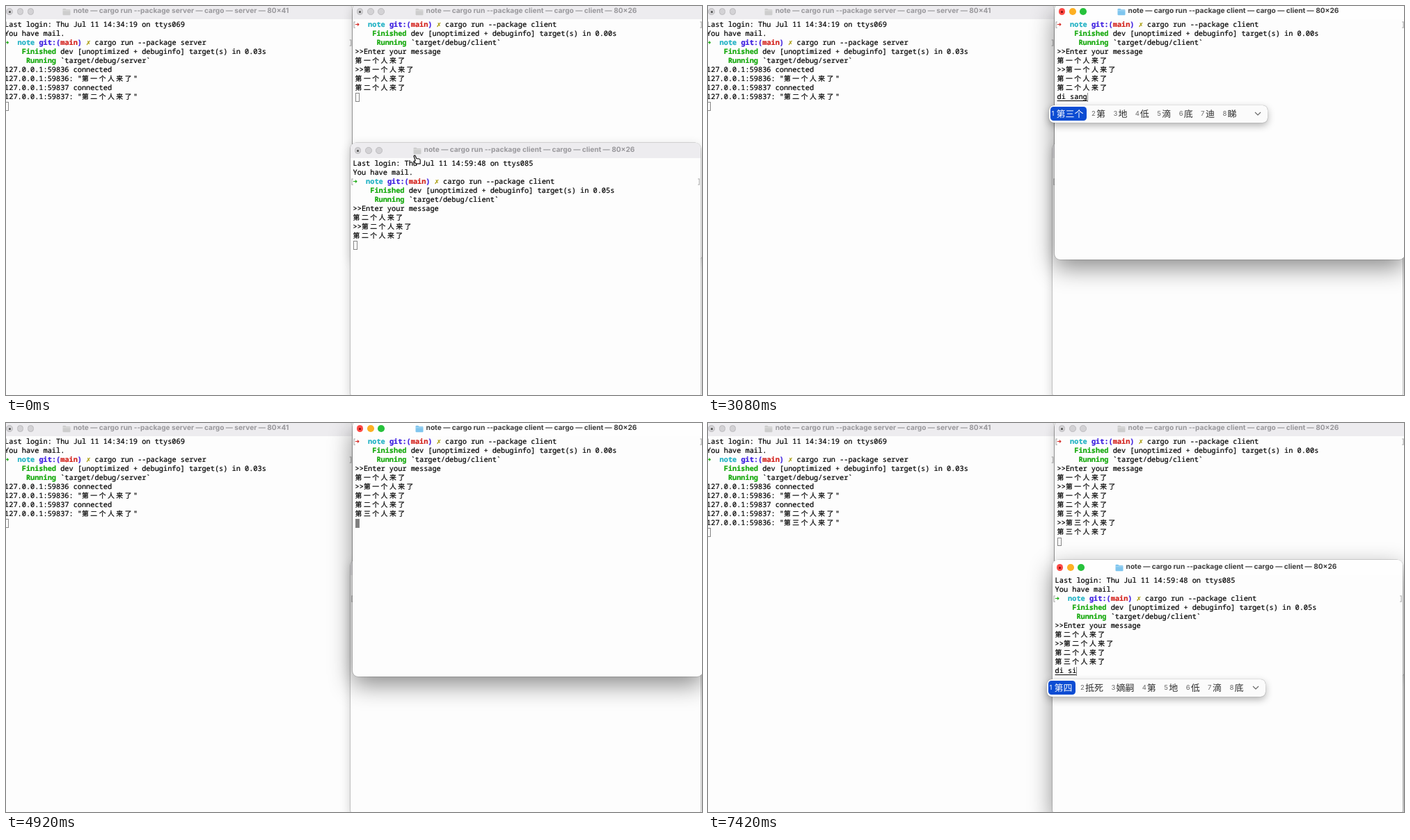
These frames come from a looping animation (1000 px wide and 560 px high, 8000 ms). An HTML page:

```html
<!DOCTYPE html>
<html lang="zh-CN">
<head>
<meta charset="utf-8">
<title>Terminal messages</title>
<style>
html, body { margin: 0; width: 100%; height: 100%; overflow: hidden; background: #fdfdfd; }
#stage { position: relative; width: 1000px; height: 560px; overflow: hidden; text-rendering: geometricPrecision; }
.win {
  position: absolute; width: 502.5px; height: 368px; border-radius: 8px; background: #fdfdfd; z-index: 1;
  box-shadow: 0 0 0 .6px rgba(0,0,0,.28), 0 5px 16px rgba(0,0,0,.2);
}
#server { left: -5.5px; top: -3px; height: 600px; z-index: 0; }
#upper { left: 498px; top: -3px; }
#lower { left: 495px; top: 197px; }
.win.front { z-index: 2; }
.win.active { box-shadow: 0 0 0 .6px rgba(0,0,0,.25), 0 12px 34px rgba(0,0,0,.45); }
.bar {
  position: relative; height: 22px; box-sizing: border-box; padding-right: 4px; border-radius: 8px 8px 0 0;
  display: flex; align-items: center; justify-content: center; gap: 3.5px;
  background: #edecef; color: #99989c; white-space: pre;
  font: 700 10.15px/21px Inter, "Liberation Sans", sans-serif;
}
.active .bar { background: #fefefe; color: #3d3d3d; }
.bar span { height: 22px; }
.folder { width: 12px; height: 11px; fill: #cdcdcd; }
.active .folder { fill: #7fc5ee; }
.bar .light {
  position: absolute; top: 6.2px; width: 9.6px; height: 9.6px; box-sizing: border-box;
  border-radius: 50%; background: #d3d2d5; border: .6px solid #bcbbbe;
}
.light:nth-child(1) { left: 5.7px; }
.light:nth-child(2) { left: 21px; }
.light:nth-child(3) { left: 36.4px; }
.light:nth-child(1)::after {
  content: ""; position: absolute; left: 2.7px; top: 2.7px; width: 3px; height: 3px;
  border-radius: 50%; background: #4a4a4a;
}
.lit .bar .light { border-color: transparent; }
.lit .light:nth-child(1) { background: #fd4a45; }
.lit .light:nth-child(1)::after { background: #7d0a08; }
.lit .light:nth-child(2) { background: #fdb024; }
.lit .light:nth-child(3) { background: #27c23c; }
.lit .bar .light:nth-child(1) { background: #fd4a45; }
.lit .bar .light:nth-child(2) { background: #fdb024; }
.lit .bar .light:nth-child(3) { background: #27c23c; }
pre {
  position: absolute; left: 3.6px; top: 23.5px; margin: 0; color: #000;
  font: 500 10.28px/13.1px "Noto Sans Mono", "DejaVu Sans Mono", monospace;
  -webkit-text-stroke: .22px;
}
.row { position: relative; height: 13.1px; white-space: pre; }
.han { font: 500 9.8px/0 "Noto Sans CJK SC", "Noto Sans CJK JP", sans-serif; letter-spacing: 2.54px; }
.mark::before, .mark::after { position: absolute; top: 0; color: #aaa; font-weight: 400; }
.mark::before { content: "["; left: -4.5px; }
.mark::after { content: "]"; left: 494.5px; }
b.green { color: #16a90d; }
b.red { color: #d3221c; }
b.cyan { color: #20b1c4; }
b.blue { color: #3a1be0; }
b.gold { color: #a79a07; }
.block {
  position: absolute; top: 0; width: 6.3px; height: 12.3px; box-sizing: border-box; border: 1px solid #868686;
}
.block.full { background: #808080; }
.typed { text-decoration: underline; text-underline-offset: 2px; text-decoration-thickness: 1px; }
.caret { position: absolute; top: 0; width: 1px; height: 13px; background: #888; }
.popup {
  position: absolute; top: 17.5px; width: 314px; height: 25px; box-sizing: border-box; padding: 0 2px;
  display: flex; align-items: center; gap: 5.4px; border-radius: 7px; background: #fbfbfb; color: #2c2c2c;
  box-shadow: 0 0 1px rgba(0,0,0,.5), 0 4px 11px rgba(0,0,0,.3);
  font: 13px/20px "Noto Sans CJK SC", "Noto Sans CJK JP", sans-serif;
  -webkit-text-stroke: 0;
}
.option { display: flex; height: 20px; padding: 0 4px 0 2px; border-radius: 4.5px; }
.option small { width: 7px; font: 9.5px/21px Inter, sans-serif; color: #6a6a6a; }
.option:first-child { background: #0b4cd3; color: #fff; }
.option:first-child small { color: #fff; }
.keycap {
  width: 15px; height: 15px; margin-top: 2px; border-radius: 3px; background: #476f8c; color: #fff;
  font: 700 11px/15px Inter, sans-serif; text-align: center;
}
.chevron { position: absolute; left: 295px; top: 9.5px; width: 10px; height: 6px; }
.chevron path { fill: none; stroke: #666; stroke-width: 1.1; }
#mouse { position: absolute; left: 0; top: 0; width: 14px; height: 18px; z-index: 5; overflow: visible; }
#mouse path { stroke-linejoin: round; stroke-linecap: round; }
</style>
</head>
<body>
<div id="stage">
  <div class="win" id="server"></div>
  <div class="win" id="upper"></div>
  <div class="win" id="lower"></div>
  <svg id="mouse"><path/></svg>
</div>
<script>
const LOOP = 8000, CELL = 6.168;
const byId = id => document.getElementById(id);
const paint = (color, text) => `<b class="${color}">${text}</b>`;
const han = text => text.replace(/[\u3400-\u9fff]+/g, '<span class="han">$&</span>');
const latest = (steps, t) => steps.filter(step => step[0] <= t).pop();

const says = n => `第${n}个人来了`;
const prompt = (arrow, kind) => `<span class="mark"></span>${paint(arrow, '➜')}  ${paint('cyan', 'note')} ` +
  paint('blue', 'git:(') + paint('red', 'main') + paint('blue', ')') +
  ` ${paint('gold', '✗')} cargo run --package ${kind}`;
const build = (kind, seconds) => [
  `    ${paint('green', 'Finished')} dev [unoptimized + debuginfo] target(s) in ${seconds}s`,
  `     ${paint('green', 'Running')} \`target/debug/${kind}\``
];
const login = (time, tty) => [`Last login: Thu Jul 11 ${time} on ${tty}`, 'You have mail.'];
const peer = port => `127.0.0.1:${port}`;

const serverRows = [
  ...login('14:34:19', 'ttys069'), prompt('green', 'server'), ...build('server', '0.03'),
  `${peer(59836)} connected`, `${peer(59836)}: "${says('一')}"`,
  `${peer(59837)} connected`, `${peer(59837)}: "${says('二')}"`
];
const upperRows = [
  prompt('red', 'client'), ...build('client', '0.00'), '>>Enter your message',
  says('一'), '>>' + says('一'), says('一'), says('二')
];
const lowerRows = [
  ...login('14:59:48', 'ttys085'), prompt('green', 'client'), ...build('client', '0.05'),
  '>>Enter your message', says('二'), '>>' + says('二'), says('二')
];

// Each step: time, committed text, letters being composed, candidates.
const rest = ' 第 地 低 滴 底 迪 睇';
const forD = '的 地 都 到 等 点 大 对 多', forDi = '第 地 低 滴 底 迪 睇 帝 弟';
const upperInput = [
  [0, ''],
  [2250, '', 'd', forD], [2670, '', 'di', forDi],
  [2750, '', 'di s', '第三' + rest], [2830, '', 'di sa', '第三' + rest],
  [3000, '', 'di san', '第三' + rest], [3080, '', 'di sang', '第三个' + rest],
  [3170, '', 'di san ge', '第三个' + rest], [3250, '', 'di san ge r', '第三个人' + rest],
  [3330, '', 'di san ge re', '第三个人' + rest], [3500, '', 'di san ge ren', '第三个人' + rest],
  [3580, '第三个人'],
  [4170, '第三个人', 'l', '了 来 老 类 力 量 两 2 里'],
  [4330, '第三个人', 'la', '啦 拉 辣 来 蜡 喇 落 腊 垃'],
  [4420, '第三个人', 'lai', '来 赖 莱 睐 濑 籁 徕 癞 涞'],
  [4500, '第三个人', 'lai l', '来了 来 赖 莱 睐 濑 籁 徕'],
  [4580, '第三个人', 'lai le', '来了 来 赖 莱 睐 濑 籁 徕'],
  [4670, says('三')], [4920, '']
];
const lowerInput = [
  [0, ''], [7250, '', 'd', forD], [7330, '', 'di', forDi],
  [7420, '', 'di si', '第四 抵死 嫡嗣 第 地 低 滴 底']
];

// Each step: time, pointer shape, left, top.
const mouseSteps = [
  [0, 'hand', 585, 214], [80, 'hand', 589, 208], [170, 'arrow', 602, 186], [250, 'beam', 606, 156],
  [330, 'beam', 608, 136], [420, 'beam', 609, 129], [2080, ''],
  [5580, 'beam', 609, 140], [5670, 'beam', 608, 190], [5750, 'beam', 608, 258],
  [5830, 'beam', 609, 325], [5920, 'arrow', 613, 374], [6000, 'arrow', 613.5, 385],
  [6080, 'beam', 610, 381], [6670, '']
];
const pointers = {
  hand: ['M3 8L1 2.2Q1.4 .6 2.9 1.4L4.8 5.6L8.6 6Q10.2 6.4 10.2 8.2V13.2H4.6L1 10.2Q.6 8.6 3 9.2Z', '#fff', '#111', 1.2],
  arrow: ['M.5 .5V10.6L2.8 8.5L4.5 12.4L6.3 11.6L4.6 7.9H7.8Z', '#000', '#fff', 1],
  beam: ['M.8 .8Q3 .8 3.3 2.2Q3.6 .8 5.8 .8M3.3 2V11M.8 12.2Q3 12.2 3.3 10.8Q3.6 12.2 5.8 12.2M2.2 8.6H4.4', 'none', '#111', 1.1]
};

function option(text, index) {
  const face = text === '2' ? '<span class="keycap">2</span>' : text;
  return `<span class="option"><small>${index + 1}</small>${face}</span>`;
}

function inputRow([, done, letters, choices], full) {
  const start = done.length * 2 * CELL;
  if (!letters) return `${han(done)}<span class="block ${full ? 'full' : ''}" style="left:${start}px"></span>`;
  return `${han(done)}<span class="typed">${letters}</span>` +
    `<span class="caret" style="left:${start + letters.length * CELL}px"></span>` +
    `<div class="popup" style="left:${start - 12}px">${choices.split(' ').map(option).join('')}` +
    '<svg class="chevron"><path d="M1 1L5 5L9 1"/></svg></div>';
}

const folder = '<svg class="folder" viewBox="0 0 12 11">' +
  '<path d="M.5 2Q.5 .8 1.7 .8H4.3L5.6 2H10.4Q11.5 2 11.5 3.2V9Q11.5 10.2 10.4 10.2H1.7Q.5 10.2 .5 9Z"/>' +
  '<path d="M.5 3.7H11.5" stroke="#fff" stroke-opacity=".5" stroke-width=".7"/></svg>';

function createWindow(id, kind, size) {
  const win = byId(id);
  const title = `note — cargo run --package ${kind} — cargo — ${kind} — ${size}`;
  win.innerHTML = `<div class="bar">${'<span class="light"></span>'.repeat(3)}${folder}` +
    `<span>${title}</span></div><pre></pre>`;
  const pre = win.querySelector('pre');
  let shown;
  return (rows, input, state) => {
    const html = [...rows.map(han), input].map(row => `<div class="row">${row}</div>`).join('');
    if (html !== shown) pre.innerHTML = shown = html;
    for (const name in state) win.classList.toggle(name, state[name]);
  };
}

const drawServer = createWindow('server', 'server', '80×41');
const drawUpper = createWindow('upper', 'client', '80×26');
const drawLower = createWindow('lower', 'client', '80×26');

function drawMouse(t) {
  const [, shape, x, y] = latest(mouseSteps, t);
  const svg = byId('mouse');
  svg.style.display = shape ? 'block' : 'none';
  if (!shape) return;
  const [d, fill, stroke, width] = pointers[shape];
  const order = shape === 'arrow' ? 'stroke' : 'normal';
  const look = { d, fill, stroke, 'stroke-width': width, 'paint-order': order };
  for (const key in look) svg.firstChild.setAttribute(key, look[key]);
  svg.style.transform = `translate(${x}px, ${y}px)`;
}

function render(t) {
  const upperFront = t >= 580 && t < 6080, lowerActive = t >= 6080;
  const server = [...serverRows], upper = [...upperRows], lower = [...lowerRows];
  if (t >= 4920) upper.push(says('三'));
  if (t >= 5000) {
    server.push(`${peer(59836)}: "${says('三')}"`);
    upper.push('>>' + says('三'));
  }
  if (t >= 5080) {
    upper.push(says('三'));
    lower.push(says('三'));
  }
  drawServer(server, inputRow([0, ''], false), {});
  drawUpper(upper, inputRow(latest(upperInput, t), t >= 750 && upperFront),
    { front: upperFront, active: upperFront, lit: t >= 580 && t < 6250 });
  drawLower(lower, inputRow(latest(lowerInput, t), t >= 6250),
    { front: !upperFront, active: lowerActive, lit: lowerActive });
  drawMouse(t);
}

const begin = performance.now();
function tick() {
  render((performance.now() - begin) % LOOP);
  requestAnimationFrame(tick);
}
tick();
</script>
</body>
</html>
```
